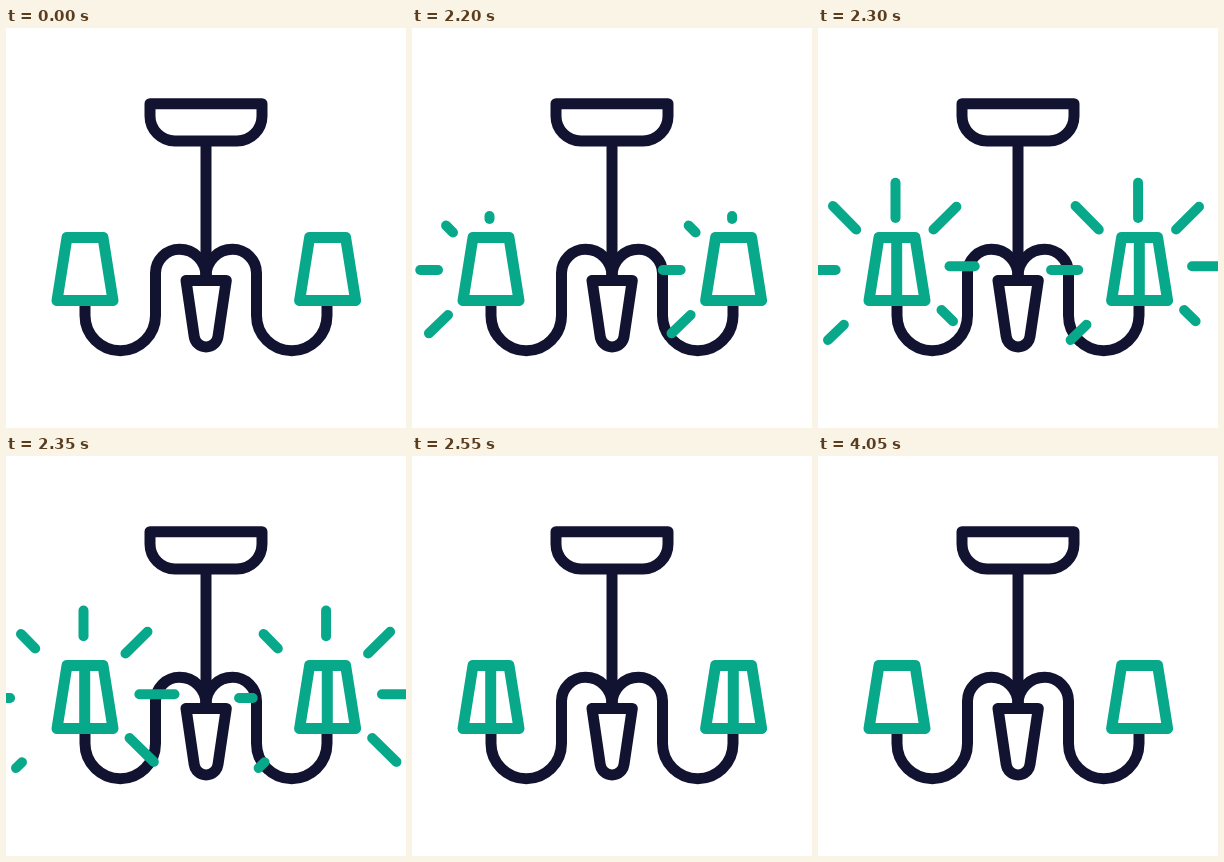
Recreate the animation shown at these times as an HTML page. Size 400 by 400 pixels, loop 4070 ms.

```html
<!DOCTYPE html>
<html lang="en">
<head>
<meta charset="utf-8">
<title>Chandelier</title>
<style>
html, body { margin: 0; width: 100%; height: 100%; overflow: hidden; background: #fff; }
svg { display: block; width: 100%; height: 100%; }
</style>
</head>
<body>
<svg viewBox="0 0 400 400" fill="none" stroke-width="11" stroke-linejoin="round">
  <g stroke="#121331">
    <path d="M144 75.7H256V88a25 25 0 0 1-25 25H169a25 25 0 0 1-25-25Z"/>
    <path d="M200 113V252"/>
    <path id="arm" d="M79 272V287.5a35.2 35.2 0 0 0 70.5 0V245a24 24 0 0 1 24-23.7C188 221.300 200 233 200 248"/>
    <use href="#arm" transform="matrix(-1 0 0 1 400 0)"/>
    <path d="M180 252.400H220.300L212 308.500a12 12 0 0 1-23.800 0Z"/>
  </g>
  <g stroke="#08a88a">
    <g id="lamp">
      <path d="M61 209.500H97L107 272.500H51Z"/>
      <path id="bulb" d="M78.700 209.500V272.500"/>
      <g id="rays" stroke-width="10" stroke-linecap="round"></g>
    </g>
    <use href="#lamp" x="242.600"/>
  </g>
</svg>
<script>
const LOOP = 4070, BURST = 2150, ON = 2300, BURST_END = 2550, OFF = 3870;
const FIRST = 2125, STAGGER = 21;

// Inner and outer end of each ray, clockwise from the lower left
const RAYS = [
  [36, 287, 10, 312],
  [26, 242, -9.5, 242],
  [41, 204.5, 15, 178],
  [77.5, 191, 77.5, 154.5],
  [115.5, 201.5, 141.5, 175.7],
  [131.5, 238.3, 168.5, 238.3],
  [123.5, 282, 149.5, 307.5]
];

const bulb = document.getElementById('bulb');
const group = document.getElementById('rays');
const lines = RAYS.map(() =>
  group.appendChild(document.createElementNS('http://www.w3.org/2000/svg', 'path')));

const show = (el, on) => el.setAttribute('visibility', on ? 'visible' : 'hidden');

function ease(t, from, to) {
  const u = Math.min(1, Math.max(0, (t - from) / (to - from)));
  return u * u * (3 - 2 * u);
}

function draw(t) {
  show(bulb, t >= ON && t < OFF);
  const burst = t >= BURST && t < BURST_END;
  RAYS.forEach(([x1, y1, x2, y2], i) => {
    const age = t - FIRST - i * STAGGER;
    const head = ease(age, -10, 120);
    const tail = ease(age, 95, 285);
    const at = k => `${x1 + (x2 - x1) * k} ${y1 + (y2 - y1) * k}`;
    lines[i].setAttribute('d', `M${at(tail)}L${at(head)}`);
    show(lines[i], burst && head > 0.02 && tail < 0.98);
  });
}

const start = performance.now();
function tick() {
  draw((performance.now() - start) % LOOP);
  requestAnimationFrame(tick);
}
tick();
</script>
</body>
</html>
```
